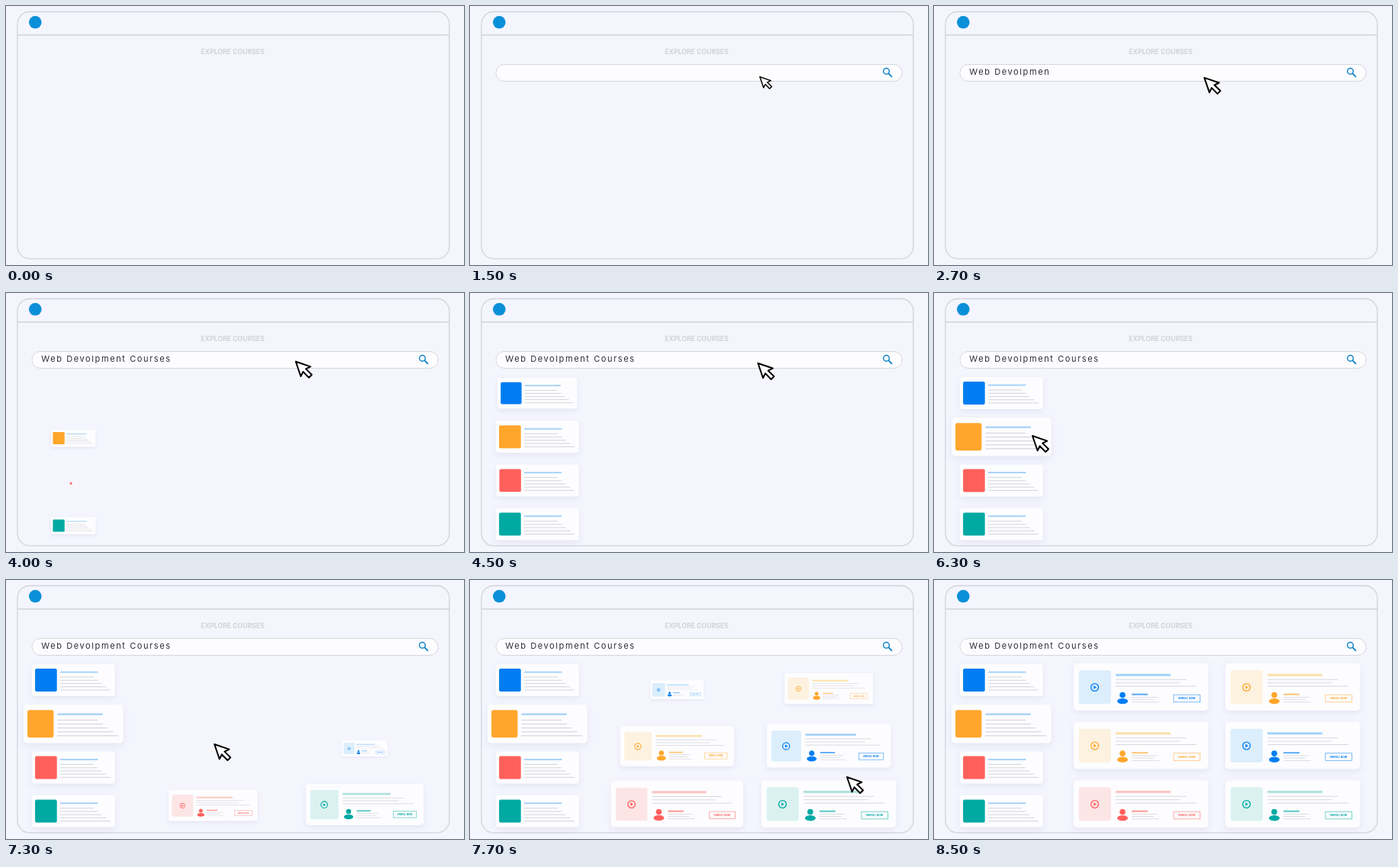
Write an HTML page that moves like this. It is 600 px wide and 339 px high and loops after 9 s.

```html
<!DOCTYPE html>
<html lang="en">
<head>
<meta charset="utf-8">
<title>Course search</title>
<style>
  html, body { margin: 0; width: 100%; height: 100%; overflow: hidden; background: #f5f5fe; }
  svg { display: block; width: 100%; height: 100%; }
  text { font-family: Inter, "Open Sans", sans-serif; }
  .card { filter: drop-shadow(0 3px 4px rgba(70, 70, 140, .09)); }
</style>
</head>
<body>
<svg viewBox="0 0 600 339" xmlns="http://www.w3.org/2000/svg">
  <rect width="600" height="339" fill="#f5f5fe"/>
  <g fill="none" stroke="#d3d4da" stroke-width="1.3">
    <rect x="15" y="7.5" width="565.7" height="323.3" rx="16"/>
    <path d="M15 38H580.7"/>
  </g>
  <circle cx="38.3" cy="21.3" r="8.3" fill="#0a90d8"/>
  <text x="297" y="63.2" text-anchor="middle" font-size="8.7" font-weight="700" fill="#d2d3da">EXPLORE COURSES</text>
  <g id="bar">
    <rect x="34" y="76.5" width="532" height="22" rx="11" fill="#fdfdff" stroke="#d5d6dd"/>
    <g fill="none" stroke="#1283cc">
      <circle cx="545.4" cy="85.4" r="3.8" stroke-width="1.5"/>
      <path d="M548.2 88.2L552.8 92.8" stroke-width="1.9"/>
    </g>
  </g>
  <text id="query" x="46.3" y="90.4" font-size="11" letter-spacing="1.6" fill="#2c2c36" xml:space="preserve"></text>
  <g id="cards"></g>
  <path id="cursor" d="M1 1L20.3 7.6L14.2 10.6L22 18.2L18.2 22L10.6 14.2L7.6 20.3Z"
    fill="#fff" stroke="#000" stroke-width="2" stroke-linejoin="round"/>
</svg>
<script>
const LOOP = 9000, STEP = 100;
const QUERY = "Web Devolpment Courses";
const $ = id => document.getElementById(id);

const themes = {
  blue:   { main: "#007df2", tint: "#dceefc", title: "#a5d2fa" },
  orange: { main: "#ffa62b", tint: "#fdf2df", title: "#fbe1ac" },
  red:    { main: "#ff605c", tint: "#fde5e6", title: "#fcc3c2" },
  teal:   { main: "#00a9a2", tint: "#daf1f0", title: "#aee0dc" }
};

const clamp = v => Math.min(1, Math.max(0, v));
const progress = (t, start, length) => clamp((t - start) / length);
const easeOut = p => 1 - (1 - p) ** 3;
const easeInOut = p => (1 - Math.cos(Math.PI * p)) / 2;

const rect = (x, y, w, h, fill, rx = 0) =>
  `<rect x="${x}" y="${y}" width="${w}" height="${h}" rx="${rx}" fill="${fill}"/>`;
const lines = (x, rows, weight) =>
  rows.map(([y, w]) => rect(x, y - weight / 2, w, weight, "#d8d7de")).join("");

// Both card drawings are centred on 0,0.
function menuCard({ main }) {
  return rect(-54.4, -21, 108.8, 42, "#fdfdff", 4) +
    rect(-50.2, -15, 28.6, 30, main, 2) +
    rect(-17.4, -11.4, 49.5, 2, "#a9d3f8") +
    lines(-17.4, [[-4, 44], [.3, 49.5], [4.5, 54.5], [8.7, 60.5], [13, 66]], 1.1);
}

function courseCard({ main, tint, title }) {
  return rect(-88.2, -31, 176.4, 62, "#fdfdff", 5) +
    rect(-81.5, -21.7, 42.2, 44, tint, 3) +
    `<circle cx="-60.6" cy=".5" r="4.9" fill="none" stroke="${main}" stroke-width="1.3"/>` +
    `<path d="M-62 -1.8V2.8L-58.2 .5Z" fill="${main}"/>` +
    rect(-33.2, -17.2, 72, 3, title) +
    lines(-33.2, [[-9.8, 93], [-5.4, 84], [-1, 106]], 1) +
    `<circle cx="-24.2" cy="10.6" r="3.8" fill="${main}"/>` +
    `<ellipse cx="-24.2" cy="18.6" rx="7" ry="3.7" fill="${main}"/>` +
    `<g opacity=".65">${rect(-12.2, 8.7, 21, 2, main)}</g>` +
    lines(-12.2, [[13.5, 33], [16.5, 29], [19.8, 36]], .9) +
    `<rect x="42.8" y="10.2" width="34.6" height="9.6" fill="none" stroke="${main}" stroke-opacity=".65" stroke-width=".8"/>` +
    `<text x="60.1" y="16.2" text-anchor="middle" font-size="3.3" font-weight="700" fill="${main}">ENROLL NOW</text>`;
}

function addCard(draw, theme, x, y, start, length, drop, hoverAt) {
  const node = document.createElementNS("http://www.w3.org/2000/svg", "g");
  node.setAttribute("class", "card");
  node.innerHTML = draw(themes[theme]);
  $("cards").append(node);
  return { node, x, y, start, length, drop, hoverAt };
}

const menu = (theme, row, start, hoverAt) =>
  addCard(menuCard, theme, 88.3, 131 + row * 57.2, start, 643, 4, hoverAt);
const course = (theme, col, row, start) =>
  addCard(courseCard, theme, 271.2 + col * 198.8, 140 + row * 76.5, start, 900, 6);

const cards = [
  menu("blue", 0, 4080),
  menu("red", 2, 3980),
  menu("teal", 3, 3855),
  menu("orange", 1, 3855, 5850),
  course("blue", 0, 0, 7560),
  course("orange", 1, 0, 7430),
  course("orange", 0, 1, 7282),
  course("blue", 1, 1, 7184),
  course("red", 0, 2, 7028),
  course("teal", 1, 2, 6850)
];

// time, x, y of the pointer tip
const path = [
  [300, 612, 166], [1200, 379, 92], [1600, 379, 92], [3000, 350, 93], [3150, 350, 93],
  [4300, 384, 88], [6100, 128, 186], [6800, 128, 186], [8200, 637, 285]
];

function pointerAt(t) {
  const next = path.findIndex(k => k[0] > t);
  if (next < 1) return (next ? path[path.length - 1] : path[0]).slice(1);
  const [a, b] = [path[next - 1], path[next]];
  const p = easeInOut(progress(t, a[0], b[0] - a[0]));
  return [1, 2].map(i => a[i] + (b[i] - a[i]) * p);
}

function place(node, x, y, scale) {
  node.setAttribute("visibility", scale > 0 ? "visible" : "hidden");
  node.setAttribute("transform", `translate(${x} ${y}) scale(${scale})`);
}

function render(t) {
  const barScale = easeOut(progress(t, 230, 643));
  place($("bar"), 300 * (1 - barScale), 87.5 * (1 - barScale), barScale);

  const typed = Math.max(0, Math.floor((t - 1975) / 55));
  $("query").textContent = QUERY.slice(0, typed);

  for (const c of cards) {
    const grow = easeOut(progress(t, c.start, c.length));
    const hover = c.hoverAt ? .2 * easeInOut(progress(t, c.hoverAt, 350)) : 0;
    place(c.node, c.x, c.y + c.drop * (1 - grow), grow * (1 + hover));
  }

  const press = 1 - .26 * Math.sin(Math.PI * progress(t, 1300, 400));
  place($("cursor"), ...pointerAt(t), press);
}

const begin = performance.now();
function tick() {
  const t = (performance.now() - begin) % LOOP;
  render(Math.floor(t / STEP) * STEP);
  requestAnimationFrame(tick);
}
tick();
</script>
</body>
</html>
```
